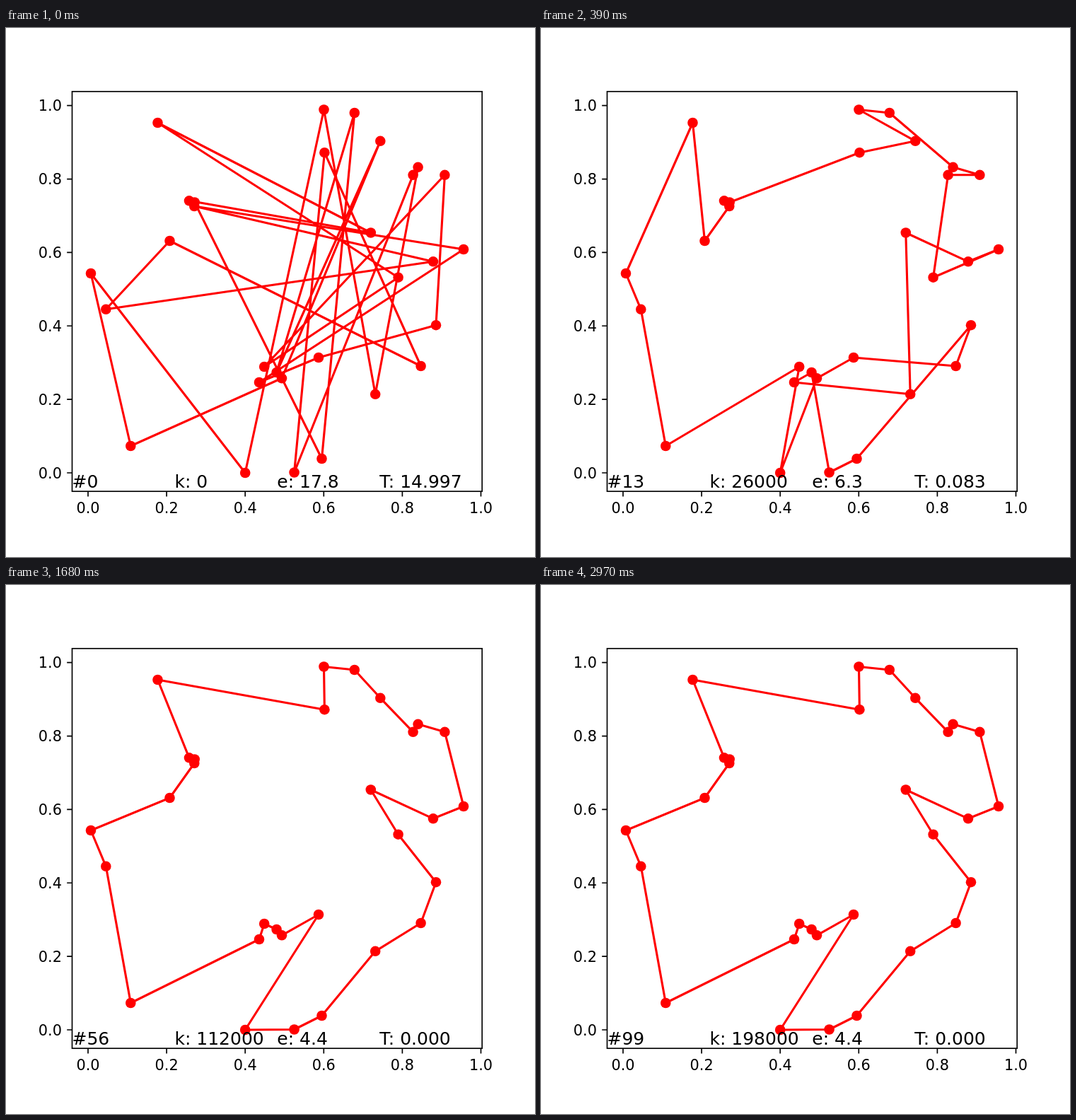
Write an HTML page with a canvas that moves like this. It is 748 px wide and 748 px high and loops after 3 s.

```html
<!DOCTYPE html>
<html lang="en">
<head>
<meta charset="utf-8">
<title>Simulated annealing tour</title>
<style>
  html, body { margin: 0; width: 100%; height: 100%; overflow: hidden; background: #fff; }
  canvas { display: block; width: 748px; height: 748px; }
</style>
</head>
<body>
<canvas id="stage" width="748" height="748"></canvas>
<script>
const ctx = document.getElementById('stage').getContext('2d');
const STEP = 30, COUNT = 100;
const BOX = { x: 93.5, y: 89.8, w: 579.7, h: 565.4 };
const ORIGIN = { x: 116, y: 629 }, SCALE = { x: 555.5, y: 519.3 };
const FONT = '"DejaVu Sans", sans-serif';

// City positions in pixels, numbered along the finished tour
const cities = [
  [214.5, 134], [259, 244.3], [266.7, 246.5], [266.3, 252], [231.5, 301], [120, 347],
  [141.3, 397.8], [176.3, 591], [358, 501], [365.2, 479], [382.6, 487], [390, 495.3],
  [442, 466], [338.2, 629], [407.6, 628.5], [446.5, 609], [522.2, 517.8], [586.6, 478],
  [608, 420.2], [554.6, 352.7], [515.8, 289.5], [604, 330.3], [647, 313], [620.4, 207.8],
  [582.6, 196.8], [575.6, 207.8], [529.3, 159.8], [492.8, 120], [449.5, 115.5], [450.4, 176.2]
];

const loop = Array.from({ length: 24 }, (_, i) => 29 - i);
const keys = [
  { at: 0, tour: [5, 13, 28, 16, 24, 25, 14, 29, 17, 4, 6, 21, 3, 22, 8, 12, 18, 23, 9, 19, 0, 20, 1, 2, 15, 27, 10, 26, 11, 7] },
  { at: 5, tour: [5, 28, 16, 11, 3, 13, 15, 4, 1, 12, 25, 26, 2, 20, 19, 29, 7, 10, 6, 14, 22, 9, 0, 27, 18, 8, 21, 24, 23, 17] },
  { at: 13, tour: [5, 0, 4, 3, 1, 2, 29, 26, 28, 27, 24, 23, 25, 19, 22, 21, 20, 16, 8, 10, 14, 15, 18, 17, 12, 11, 13, 9, 7, 6] },
  { at: 18, tour: [5, 4, 3, 1, 2, 0, ...loop] },
  { at: 21, tour: [5, 4, 3, 2, 1, 0, ...loop] }
];

// All tours met while turning one tour into another by segment reversals
function reversals(from, to) {
  const list = [from];
  let cur = from;
  to.forEach((city, i) => {
    const j = cur.indexOf(city);
    if (j === i) return;
    cur = [...cur.slice(0, i), ...cur.slice(i, j + 1).reverse(), ...cur.slice(j + 1)];
    list.push(cur);
  });
  return list;
}

function buildTours() {
  const tours = [];
  for (let n = 0; n < keys.length - 1; n++) {
    const a = keys[n], b = keys[n + 1];
    const list = reversals(a.tour, b.tour);
    for (let i = a.at; i < b.at; i++) {
      tours.push(list[Math.floor((i - a.at) / (b.at - a.at) * (list.length - 1))]);
    }
  }
  const last = keys[keys.length - 1].tour;
  while (tours.length < COUNT) tours.push(last);
  return tours;
}

function tourLength(tour) {
  return tour.reduce((sum, c, i) => {
    const p = cities[c], q = cities[tour[(i + 1) % tour.length]];
    return sum + Math.hypot((p[0] - q[0]) / SCALE.x, (p[1] - q[1]) / SCALE.y);
  }, 0);
}

const tours = buildTours();

function text(str, x, y, size, align) {
  ctx.font = size + 'px ' + FONT;
  ctx.textAlign = align;
  ctx.fillText(str, x, y);
}

function drawAxes() {
  const bottom = BOX.y + BOX.h;
  ctx.strokeStyle = ctx.fillStyle = '#000';
  ctx.lineWidth = 1.67;
  ctx.lineJoin = 'miter';
  ctx.strokeRect(BOX.x, BOX.y, BOX.w, BOX.h);
  ctx.beginPath();
  for (let i = 0; i <= 5; i++) {
    const v = i / 5, label = v.toFixed(1);
    const x = ORIGIN.x + v * SCALE.x, y = ORIGIN.y - v * SCALE.y;
    ctx.moveTo(x, bottom);
    ctx.lineTo(x, bottom + 7.3);
    ctx.moveTo(BOX.x, y);
    ctx.lineTo(BOX.x - 7.3, y);
    text(label, x, 685.5, 20.83, 'center');
    text(label, 78.9, y + 7.7, 20.83, 'right');
  }
  ctx.stroke();
}

function drawTour(tour) {
  ctx.strokeStyle = ctx.fillStyle = '#f00';
  ctx.lineWidth = 3.125;
  ctx.lineJoin = 'round';
  ctx.beginPath();
  tour.forEach(c => ctx.lineTo(...cities[c]));
  ctx.closePath();
  ctx.stroke();
  for (const [x, y] of cities) {
    ctx.beginPath();
    ctx.arc(x, y, 7.3, 0, Math.PI * 2);
    ctx.fill();
  }
}

function drawStatus(i) {
  const k = i * 2000;
  const temp = 15 * Math.pow(0.9998, k + 1);
  const parts = ['#' + i, 'k: ' + k, 'e: ' + tourLength(tours[i]).toFixed(1), 'T: ' + temp.toFixed(3)];
  ctx.fillStyle = '#000';
  parts.forEach((s, n) => text(s, BOX.x + n * BOX.w / 4, 649.5, 25, 'left'));
}

function draw(now) {
  const i = Math.floor(now / STEP + 1e-6) % COUNT;
  ctx.fillStyle = '#fff';
  ctx.fillRect(0, 0, 748, 748);
  drawTour(tours[i]);
  drawAxes();
  drawStatus(i);
}

function tick() {
  draw(performance.now());
  requestAnimationFrame(tick);
}
tick();
</script>
</body>
</html>
```
